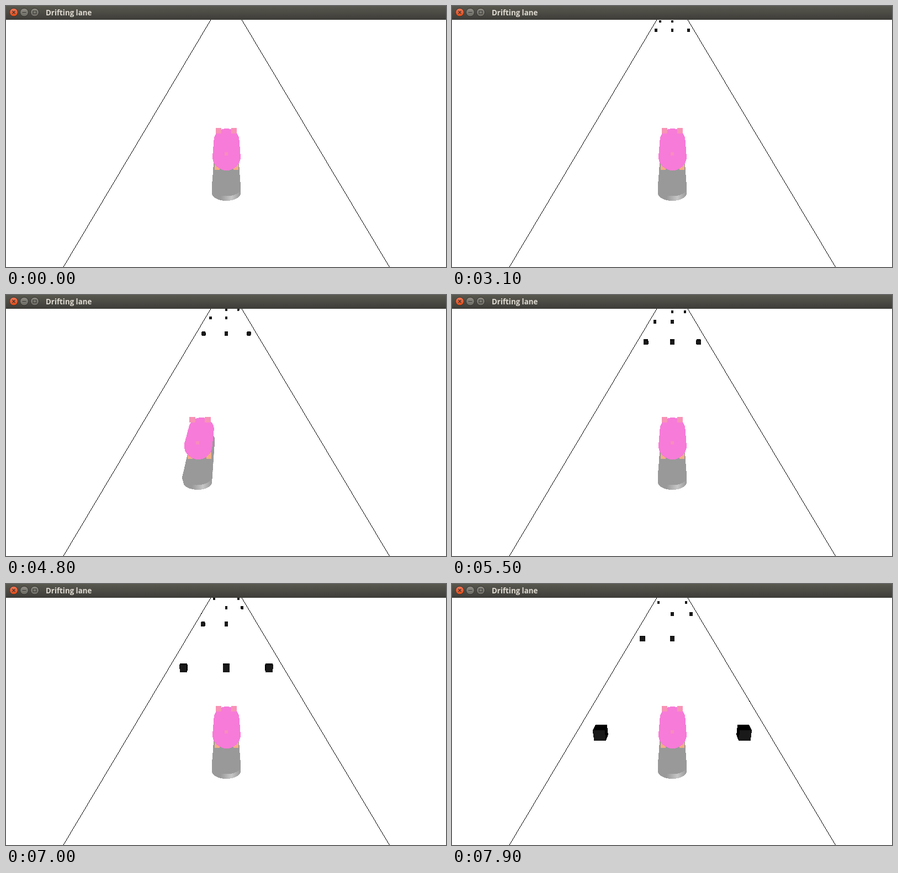
Write an HTML page that moves like this. It is 797 px wide and 473 px high and loops after 8000 ms.

```html
<!DOCTYPE html>
<html lang="en">
<head>
<meta charset="utf-8">
<title>Drifting lane</title>
<style>
  html, body { margin: 0; width: 100%; height: 100%; overflow: hidden; background: #fff; }
  svg { display: block; width: 797px; height: 473px; }
  text { font: bold 13.3px "Open Sans", "Noto Sans", sans-serif; fill: #dfdbd2; }
</style>
</head>
<body>
<svg viewBox="0 0 797 473">
  <defs>
    <linearGradient id="bar" x2="0" y2="1">
      <stop stop-color="#59584f"/><stop offset="1" stop-color="#3d3c38"/>
    </linearGradient>
    <linearGradient id="rim">
      <stop offset=".3" stop-color="#999"/><stop offset=".68" stop-color="#c6c6c6"/><stop offset="1" stop-color="#999"/>
    </linearGradient>
    <linearGradient id="close" x2="0" y2="1">
      <stop stop-color="#f4795a"/><stop offset="1" stop-color="#dd4814"/>
    </linearGradient>
    <linearGradient id="button" x2="0" y2="1">
      <stop stop-color="#8f8d85"/><stop offset="1" stop-color="#6b6a63"/>
    </linearGradient>
  </defs>
  <g shape-rendering="crispEdges">
    <path d="M370.5 25h1L104.500 473h-1zM426.500 25h1L695.100 473h-1z"/>
    <g id="scene"></g>
  </g>
  <rect width="797" height="25" fill="url(#bar)"/>
  <g stroke="#34332e">
    <circle cx="14" cy="11.5" r="7.5" fill="url(#close)"/>
    <circle cx="33" cy="11.5" r="7.5" fill="url(#button)"/>
    <circle cx="52" cy="11.5" r="7.5" fill="url(#button)"/>
    <path d="M11.500 9l5 5m0-5l-5 5M29.500 11.500h7M49 9h6v5h-6z" fill="none" stroke-width="1.1"/>
  </g>
  <text x="72" y="17">Drifting lane</text>
</svg>
<script>
const scene = document.getElementById("scene");
const LOOP = 8000, STEP = 100;

// Camera: focal length, pitch, horizon line and vanishing column
const F = 541, PITCH = Math.atan(271 / F), HORIZON = -22, MID = 399;
const SIN = Math.sin(PITCH), COS = Math.cos(PITCH);

// Obstacles: lanes used in each row, nearest row first
const ROWS = [[-1, 0, 1], [-1, 0], [0, 1], [-1, 1]];
const LANE = 0.428, SIZE = 0.07, GAP = 2.51;

// [ms, screen y of the nearest row's base]
const PACE = [[0, 25], [200, 26], [1300, 32], [2200, 38], [3100, 47], [3400, 50.8], [4800, 74],
  [5800, 98], [6400, 120], [6700, 139], [7500, 209], [7600, 223], [7900, 284]];

const clamp = v => Math.min(1, Math.max(0, v));
const mix = (a, b, k) => a + (b - a) * k;
const depthAt = y => F / (y - HORIZON);

function rowDepth(t) {
  const i = Math.max(1, PACE.findIndex(p => p[0] >= t));
  const [t0, y0] = PACE[i - 1], [t1, y1] = PACE[i];
  return mix(depthAt(y0), depthAt(y1), (t - t0) / (t1 - t0));
}

function project(x, height, back, depth) {
  const d = depth - height * SIN + back * COS;
  return [MID + F * x / d, HORIZON + F * (1 - height / COS) / d];
}

const poly = (points, fill) => `<polygon points="${points.join(" ")}" fill="${fill}"/>`;
const rect = (x, y, w, h, fill) => `<rect x="${x}" y="${y}" width="${w}" height="${h}" fill="${fill}"/>`;
const ellipse = ([x, y, rx, ry], fill) =>
  `<ellipse cx="${x}" cy="${y}" rx="${rx}" ry="${ry}" fill="${fill}"/>`;

// Solid swept from one ellipse to another
function sweep(a, b, fill, n = 30) {
  let out = "";
  for (let i = 0; i <= n; i++) out += ellipse(a.map((v, j) => mix(v, b[j], i / n)), fill);
  return out;
}

function cube(lane, depth) {
  const h = SIZE / 2, x = lane * LANE, inner = x - lane * h;
  const face = (corners, fill) => poly(corners.map(c => project(...c, depth)), fill);
  let out = face([[x - h, SIZE, 0], [x + h, SIZE, 0], [x + h, SIZE, SIZE], [x - h, SIZE, SIZE]], "#000");
  if (lane) out += face([[inner, 0, 0], [inner, SIZE, 0], [inner, SIZE, SIZE], [inner, 0, SIZE]], "#000");
  return out + face([[x - h, 0, 0], [x + h, 0, 0], [x + h, SIZE, 0], [x - h, SIZE, 0]], "#191919");
}

// k: 0 in the middle lane, 1 in the left lane
function rider(k) {
  const at = (x, shift) => x - shift * k;
  const wheel = (x, y, w, h, shift) =>
    rect(at(x, shift), y, w, h, "#000") + rect(at(x + w - 2, shift), y + 3, 1, h - 7, "#fff");
  const near = [at(MID, 160.5), 331, 26.5, 13.5], far = [at(MID, 127), 260, 21.2, 13];
  const nearBase = [at(MID, 155.5), 339.5, 26, 13.5], farBase = [at(MID, 124.5), 264, 20.8, 13];

  let out = wheel(411, 276, 7, 11, 127) + wheel(412, 324, 9, 14, 148);
  out += sweep(farBase, nearBase, "#999") + sweep(near, nearBase, "url(#rim)", 9) + sweep(far, near, "#999");
  out += rect(at(410, 137), 264, 8, 12, "#fa9fb6") + rect(at(410, 137), 276, 8, 4, "#f2ae85");
  for (const x of [378, 412]) out += rect(at(x, 146), 285, 8.5, 12, "#f2ae85");
  out += sweep([at(399.5, 137), 243, 23, 21], [at(399.5, 154), 273.5, 25.5, 24.5], "#f77bd8");
  for (const x of [380, 408]) out += rect(at(x, 143), 221, 10 + 2 * k, 10, "#f794b6");
  return out + rect(at(396, 156), 265, 6, 6, "#f78cbe");
}

function draw(now) {
  const t = Math.floor(now % LOOP / STEP) * STEP;
  const depth = rowDepth(t);
  let out = "";
  for (let i = ROWS.length - 1; i >= 0; i--)
    for (const lane of ROWS[i]) out += cube(lane, depth + i * GAP);
  const slide = clamp((t - 3100) / 300) - clamp((t - 4600) / 300);
  scene.innerHTML = out + rider(slide);
}

let start;
function tick(now) {
  start ??= now;
  draw(now - start);
  requestAnimationFrame(tick);
}
draw(0);
requestAnimationFrame(tick);
</script>
</body>
</html>
```
